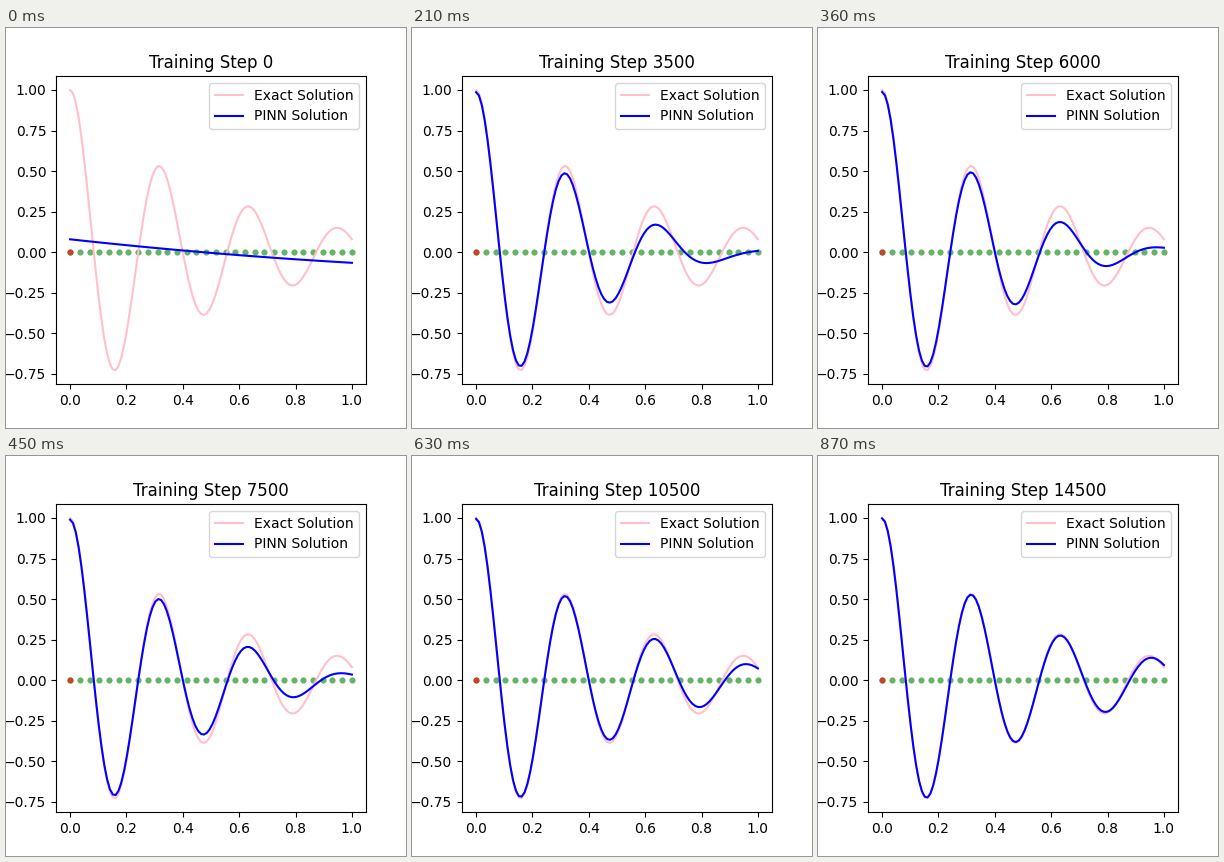
These frames come from a looping animation (400 px wide and 400 px high, 0.9 s). A matplotlib script:

```python
import math
import numpy as np
import matplotlib.pyplot as plt
from matplotlib.animation import FuncAnimation

FRAMES, INTERVAL, STEPS_PER_FRAME = 30, 30, 500
DAMPING, OMEGA0 = 2, 20

# How far along the time axis the network has learned the wave, by frame.
REACH_AT = [1, 4, 7, 12, 17, 25, 29]
REACH = [.06, .45, .707, .744, .845, 1.35, 1.62]


def oscillator(t):
    """Underdamped oscillator released at rest from 1."""
    w = math.sqrt(OMEGA0**2 - DAMPING**2)
    phi = math.atan(-DAMPING / w)
    amp = 1 / (2 * math.cos(phi))
    return np.exp(-DAMPING * t) * 2 * amp * np.cos(phi + w * t)


def prediction(i, t):
    """Network output: the wave, damped beyond its reach and lagging late on."""
    if i == 0:
        return .079 - .19 * t + .045 * t**2
    reach = float(np.interp(i, REACH_AT, REACH))
    softness = .08 + .12 * reach
    gain = 1 / (1 + np.exp((t - reach) / softness))
    lag = .28 * (4 / i)**1.65 * t**5
    return gain * oscillator(t - lag)


t = np.linspace(0, 1, 100, dtype=np.float32)

fig, ax = plt.subplots(figsize=(4, 4), dpi=100)
ax.scatter(np.linspace(0, 1, 30), np.zeros(30), s=20, lw=0, color="green", alpha=.6)
ax.scatter(0, 0, s=20, lw=0, color="red", alpha=.6)
ax.plot(t, oscillator(t), color="pink", label="Exact Solution")
pinn, = ax.plot(t, prediction(0, t), color="blue", label="PINN Solution")
ax.legend(loc="upper right")
title = ax.set_title("Training Step 0")


def update(i):
    pinn.set_ydata(prediction(i, t))
    title.set_text(f"Training Step {i * STEPS_PER_FRAME}")
    return pinn, title


anim = FuncAnimation(fig, update, frames=FRAMES, interval=INTERVAL,
                     repeat=True, repeat_delay=0)
plt.show()
```
